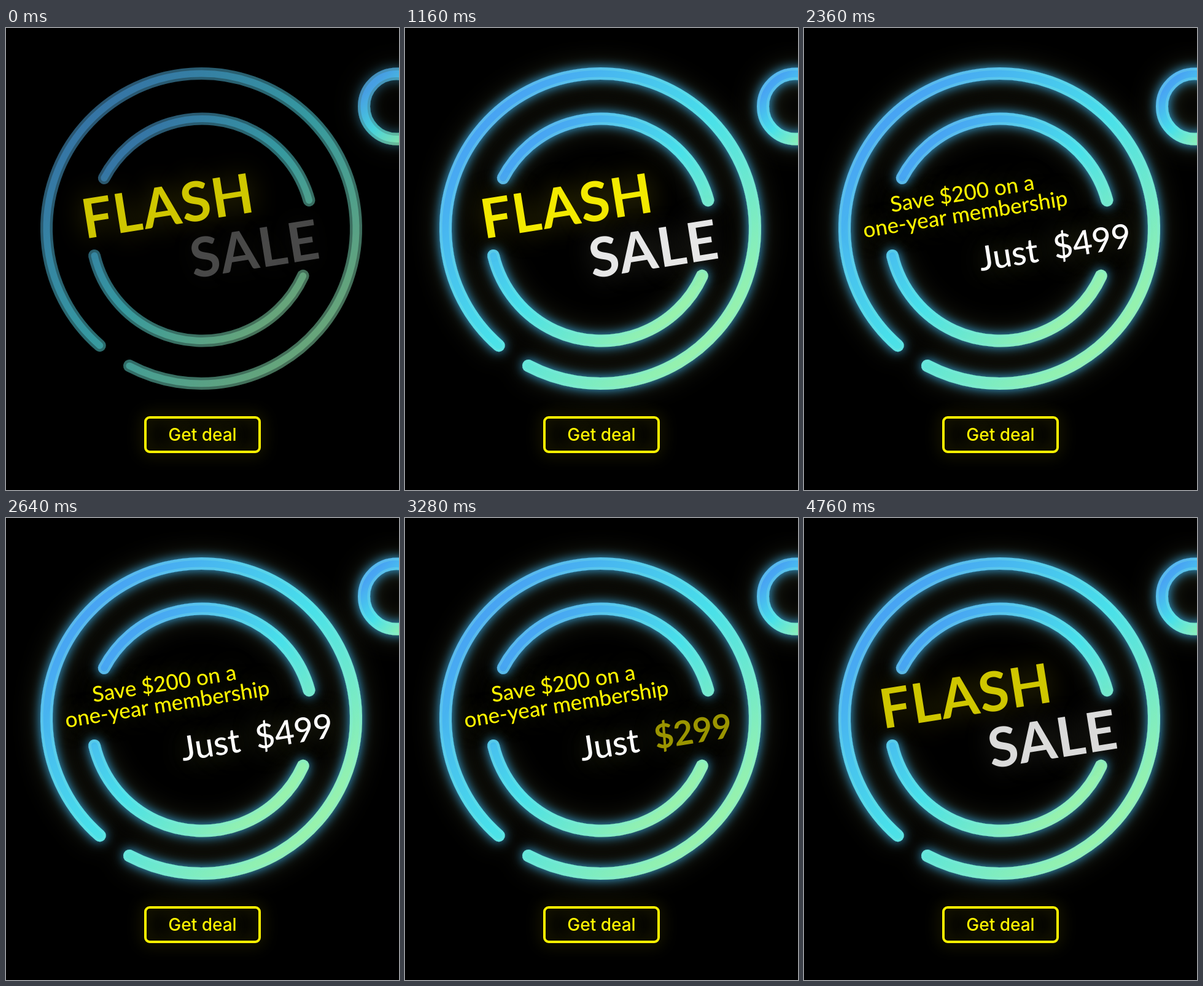
Animation of 640 by 751 pixels, one loop 4800 ms. Source, as an HTML page with a canvas:

```html
<!DOCTYPE html>
<html lang="en">
<head>
<meta charset="utf-8">
<title>Flash sale</title>
<style>
  html, body { margin: 0; width: 100%; height: 100%; overflow: hidden; background: #000; }
  canvas { display: block; }
</style>
</head>
<body>
<canvas id="stage" width="640" height="751"></canvas>
<script>
const ctx = document.getElementById('stage').getContext('2d');
const LOOP = 4800;
const TILT = -9 * Math.PI / 180;
const YELLOW = '#fff500';
const WHITE = '#fff';
const HALO = 'rgba(190, 200, 100, 0.4)';

// Brightness over time as [ms, value] points, linear in between.
const LEVELS = {
  rings: [[0, .4], [80, .45], [240, 1]],
  smallRing: [[0, .72], [200, 1]],
  flash: [[0, .8], [120, .7], [240, .95], [1880, .95], [2000, 0],
          [4400, 0], [4480, .6], [4560, .4], [4680, .8]],
  sale: [[0, .28], [120, .28], [320, .9], [1880, .9], [2000, 0],
         [4400, 0], [4520, .4], [4640, .85]],
  offer: [[2000, 0], [2080, .6], [2120, .4], [2240, 1], [4280, 1], [4400, 0]],
  oldPrice: [[2840, 1], [2960, .83], [3200, 0]],
  newPrice: [[3200, 0], [3280, .6], [3320, .4], [3440, 1]]
};

function level(name, t) {
  const points = LEVELS[name];
  const next = points.findIndex(p => p[0] > t);
  if (next === 0) return points[0][1];
  if (next < 0) return points[points.length - 1][1];
  const [t0, v0] = points[next - 1], [t1, v1] = points[next];
  return v0 + (v1 - v0) * (t - t0) / (t1 - t0);
}

function glow(color, blur) {
  ctx.shadowColor = color;
  ctx.shadowBlur = blur;
}

// Each arc is given by its two end points and runs clockwise.
function ring(x, y, r, arcs, alpha) {
  const d = r;
  const gradient = ctx.createLinearGradient(x - d * .71, y - d * .71, x + d * .71, y + d * .71);
  gradient.addColorStop(0, '#48a4f3');
  gradient.addColorStop(.5, '#48e0ea');
  gradient.addColorStop(1, '#98f2ac');

  const path = new Path2D();
  for (const [x0, y0, x1, y1] of arcs) {
    const start = Math.atan2(y0 - y, x0 - x);
    let end = Math.atan2(y1 - y, x1 - x);
    if (end <= start) end += 2 * Math.PI;
    path.moveTo(x + r * Math.cos(start), y + r * Math.sin(start));
    path.arc(x, y, r, start, end);
  }
  const stroke = (style, width) => {
    ctx.strokeStyle = style;
    ctx.lineWidth = width;
    ctx.stroke(path);
  };

  ctx.save();
  ctx.lineCap = 'round';
  const glowAlpha = Math.max(0, (alpha - .45) / .55);
  if (glowAlpha) {
    ctx.globalAlpha = glowAlpha;
    glow('rgba(170, 175, 100, 0.3)', 44);
    stroke(gradient, 20);
    glow('#36a8e4', 18);
    stroke(gradient, 20);
    glow('transparent', 0);
    ctx.globalAlpha = 1;
    stroke('#000', 20);
  }
  ctx.globalAlpha = alpha;
  stroke(gradient, 20);
  stroke('rgba(130, 230, 225, 0.3)', 20);
  stroke(gradient, 11);
  ctx.restore();
}

function label(text, x, y, font, color, alpha, options = {}) {
  if (alpha <= 0) return;
  const { align = 'center', tilt = TILT, spacing = 0, halo = HALO, blur = 44 } = options;
  ctx.save();
  ctx.translate(x, y);
  ctx.rotate(tilt);
  ctx.font = font;
  ctx.textAlign = align;
  ctx.letterSpacing = spacing + 'px';
  ctx.fillStyle = color;
  ctx.globalAlpha = alpha;
  glow(halo, blur);
  ctx.fillText(text, 0, 0);
  ctx.restore();
}

function button() {
  ctx.save();
  ctx.strokeStyle = YELLOW;
  ctx.lineWidth = 4;
  glow('rgba(255, 240, 0, 0.4)', 26);
  ctx.beginPath();
  ctx.roundRect(227, 633, 186, 56, 7);
  ctx.stroke();
  ctx.restore();
  label('Get deal', 320, 671, '500 28px Inter, sans-serif', YELLOW, 1,
    { tilt: 0, halo: 'rgba(255, 240, 0, 0.4)', blur: 30 });
}

function draw(t) {
  ctx.fillStyle = '#000';
  ctx.fillRect(0, 0, 640, 751);

  const rings = level('rings', t);
  ring(318, 326, 252, [[201, 549, 153, 516]].map(([a, b, c, d]) => [c, d, a, b]), rings);
  ring(319.5, 328, 180.5, [[160, 244, 494, 280], [484, 403, 144, 370]], rings);
  ring(636, 127.5, 53, [[689, 127.5, 689, 127.5]], level('smallRing', t));

  const title = '700 89px Lato, sans-serif';
  label('FLASH', 268.5, 320.5, title, YELLOW, level('flash', t),
    { spacing: 1.5, halo: 'rgba(200, 185, 20, 0.4)' });
  label('SALE', 410, 390.4, title, WHITE, level('sale', t),
    { spacing: 1.5, halo: 'rgba(150, 150, 120, 0.35)' });

  const offer = level('offer', t);
  const small = '500 35px Lato, sans-serif';
  const price = { align: 'left' };
  label('Save $200 on a', 259.5, 281, small, YELLOW, offer);
  label('one-year membership', 264.5, 314.6, small, YELLOW, offer);
  label('Just', 288, 395, '500 55px Lato, sans-serif', WHITE, offer, price);
  label('$499', 409, 376, '500 55px Lato, sans-serif', WHITE, offer * level('oldPrice', t), price);
  label('$299', 409, 376, '700 55px Lato, sans-serif', YELLOW, offer * level('newPrice', t), price);

  button();
}

function tick() {
  draw(performance.now() % LOOP);
  requestAnimationFrame(tick);
}
tick();
</script>
</body>
</html>
```
